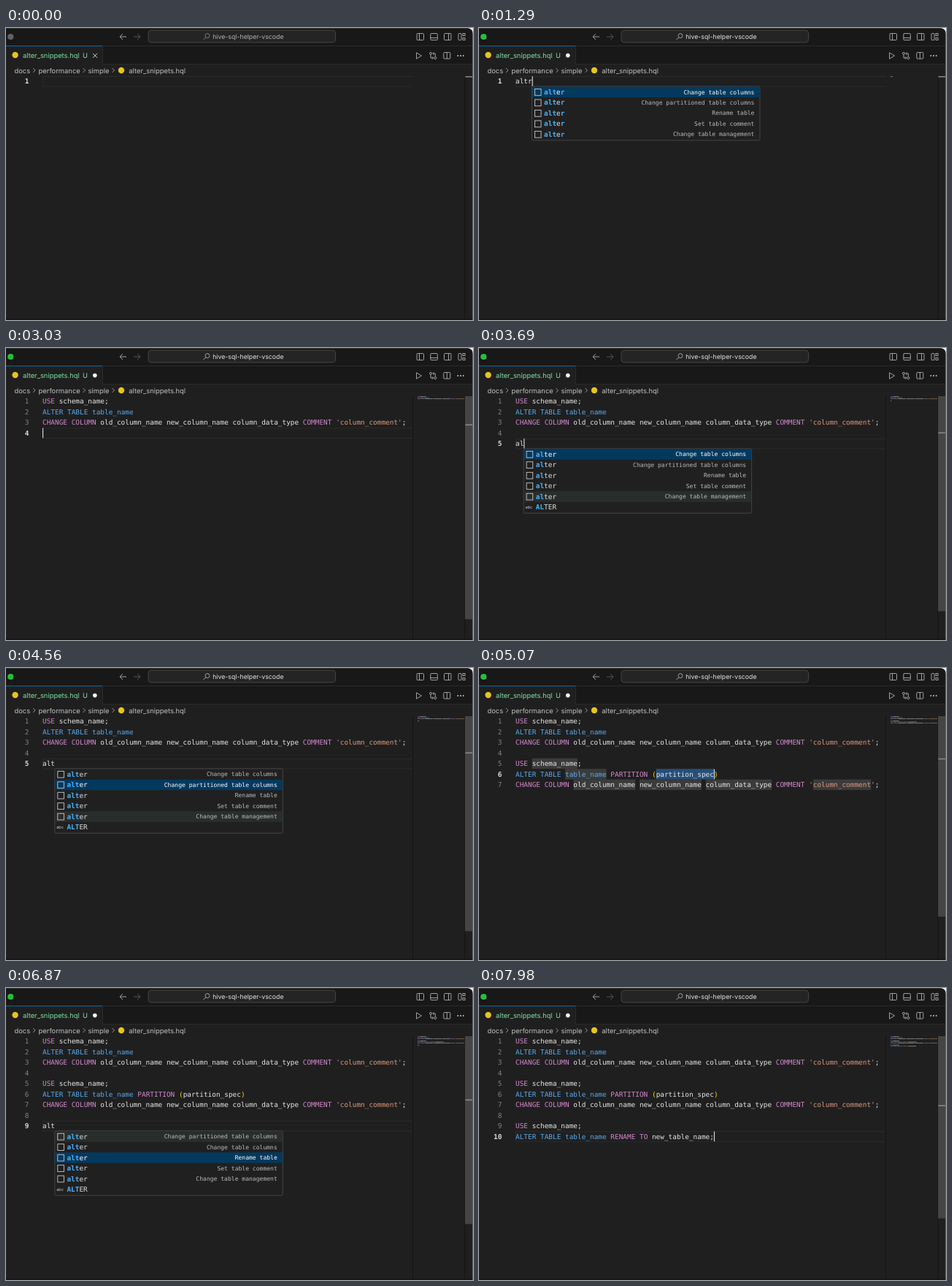
An HTML page for the animation above (8000 ms loop, 640 by 400 pixels).

```html
<!DOCTYPE html>
<html lang="en">
<head>
<meta charset="utf-8">
<title>Snippet completion</title>
<style>
html, body { margin: 0; width: 100%; height: 100%; overflow: hidden; background: #1f1f1f; }
svg { display: block; width: 640px; height: 400px; }
text { white-space: pre; text-rendering: geometricPrecision; }
.ui { font: 9.4px Inter, "Open Sans", sans-serif; }
.code { font: 9.41px "DejaVu Sans Mono", monospace; }
.current { font-weight: bold; }
.hint { font: 8.06px "DejaVu Sans Mono", monospace; text-anchor: end; }
.abc { font: 5.6px Inter, sans-serif; }
.icon { fill: none; stroke: #b0b0b0; stroke-width: .9; }
#title { font-size: 8.75px; }
</style>
</head>
<body>
<svg viewBox="0 0 640 400">
  <rect width="640" height="400" fill="#1f1f1f"/>
  <rect width="640" height="50" fill="#181818"/>
  <path d="M0 24.5H640M132 49.5H640M132.5 25V50" stroke="#2b2b2b"/>
  <rect y="25" width="132" height="25" fill="#1f1f1f"/>
  <rect y="24" width="132" height="1.2" fill="#0c609f"/>
  <path d="M0 .5H640" stroke="#333"/>

  <circle id="light" cx="6.3" cy="12" r="4.1"/>
  <path class="icon" d="M165 12H156M160 8L156 12L160 16"/>
  <path class="icon" d="M175 12H184M180 8L184 12L180 16" style="stroke:#5c5c5c"/>
  <rect x="195" y="3.2" width="256.5" height="16.6" rx="4" fill="#242424" stroke="#454545"/>
  <g id="search" class="icon"><circle cx="276" cy="10.6" r="3"/><path d="M273.8 12.8L270.5 16.2"/></g>
  <text id="title" class="ui" x="283.2" y="14.6">hive-sql-helper-vscode</text>

  <g class="icon">
    <rect x="563" y="7.5" width="9.5" height="9" rx="1"/><path d="M566.5 7.5V16.5"/>
    <rect x="581.8" y="7.5" width="9.5" height="9" rx="1"/><path d="M582 13.5H591"/>
    <rect x="600.5" y="7.5" width="9.5" height="9" rx="1"/><path d="M606.5 7.5V16.5"/>
    <rect x="620" y="7.5" width="4" height="9" rx="1"/>
    <rect x="626" y="7.5" width="3" height="3"/><rect x="626" y="13.5" width="3" height="3"/>
    <path d="M562.5 33.8L569.5 38L562.5 42.2Z"/>
    <circle cx="582" cy="34.8" r="1.5"/><circle cx="588.3" cy="41.2" r="1.5"/>
    <path d="M582 36.5V41H585.5M584 39.3L585.7 41L584 42.7M588.3 39.5V35H585M586.5 33.3L584.8 35L586.5 36.7"/>
    <rect x="599.8" y="33.5" width="9" height="8.5" rx="1"/><path d="M604.3 33.5V42"/>
  </g>
  <g fill="#c5c5c5"><circle cx="619.3" cy="38" r="1"/><circle cx="623" cy="38" r="1"/><circle cx="626.7" cy="38" r="1"/></g>

  <g fill="#e5c51f"><circle cx="12.6" cy="37" r="4.2"/><circle cx="158" cy="58" r="4.2"/></g>
  <g class="ui" fill="#7fe0a0"><text x="23" y="40.6">alter_snippets.hql</text><text x="105" y="40.6">U</text></g>
  <path id="close" class="icon" d="M119 34.8L125 40.8M125 34.8L119 40.8" style="stroke:#e4e4e4"/>
  <circle id="dirty" cx="121.8" cy="37.6" r="2.8" fill="#fff"/>

  <g class="ui" fill="#c0c0c0">
    <text x="11.5" y="61.5">docs</text><text x="44.5" y="61.5">performance</text>
    <text x="112.5" y="61.5">simple</text><text x="168.3" y="61.5">alter_snippets.hql</text>
  </g>
  <path class="icon" d="M37 55L40 58L37 61M105.5 55L108.5 58L105.5 61M145.5 55L148.5 58L145.5 61" style="stroke:#a0a0a0"/>

  <g id="editor"></g>
  <path d="M629 66V398" stroke="#141414"/>
  <g id="ruler"></g>
  <path d="M0 398.5H640" stroke="#161616"/>
  <rect y="399" width="640" height="1" fill="#181818"/>
  <path d="M639.5 0V400" stroke="#5c5c5c"/>
  <path d="M633 0H640V8Q639.5 1 633 0Z" fill="#f0f0f0"/>
</svg>
<script>
const LOOP = 8000, LEFT = 50, TOP = 65.8, ROW = 14.47, CH = 5.665, VIEW = 344;
const $ = id => document.getElementById(id);
const CHANGE = "CHANGE COLUMN {old_column_name} {new_column_name} {column_data_type} COMMENT '{column_comment}';";
const snippets = {
  "Change table columns": ["USE {schema_name};", "ALTER TABLE {table_name}", CHANGE],
  "Change partitioned table columns":
    ["USE {schema_name};", "ALTER TABLE {table_name} PARTITION ({partition_spec})", CHANGE],
  "Rename table": ["USE {schema_name};", "ALTER TABLE {table_name} RENAME TO {new_table_name};"],
  "Set table comment": [],
  "Change table management": []
};

const steps = [
  [180, "focus"],
  [510, "type", "a"], [720, "type", "l"], [930, "type", "t"], [1200, "type", "r"], [1500, "accept"],
  [1740, "tab"], [1920, "tab"], [2130, "tab"], [2340, "tab"], [2550, "tab"], [2760, "tab"],
  [3030, "enter"], [3240, "enter"],
  [3480, "type", "a"], [3660, "type", "l"], [3840, "type", "t"], [4140, "down"], [4620, "accept"],
  [4890, "tab"], [5040, "tab"], [5220, "tab"], [5340, "tab"], [5460, "tab"], [5580, "tab"], [5700, "tab"],
  [5820, "enter"], [5970, "enter"],
  [6090, "type", "a"], [6210, "type", "l"], [6330, "type", "t"], [6720, "down"], [6870, "down"],
  [7080, "accept"], [7320, "tab"], [7560, "tab"], [7800, "tab"]
];

const actions = {
  focus(s) { s.focus = true; },
  type(s, ch) {
    s.lines[s.row] += ch;
    s.col++;
    s.dirty = s.popup = true;
    s.pick = 0;
  },
  down(s) { s.pick++; },
  enter(s) { s.lines.push(""); s.row++; s.col = 0; },
  accept(s) {
    const name = s.names[s.pick], first = s.row;
    s.names = [name, ...s.names.filter(n => n !== name)];
    s.popup = false;
    s.lines.pop();
    snippets[name].forEach((line, i) => {
      let text = "";
      line.split(/[{}]/).forEach((part, k) => {
        if (k % 2) s.stops.push({ row: first + i, col: text.length, len: part.length });
        text += part;
      });
      s.lines.push(text);
    });
    s.stop = -1;
    actions.tab(s);
  },
  tab(s) {
    const p = s.stops[++s.stop];
    if (p) { s.row = p.row; s.col = p.col + p.len; return; }
    s.stops = [];
    s.row = s.lines.length - 1;
    s.col = s.lines[s.row].length;
  }
};

// Replay the key presses once and keep the state after each of them.
let state = { at: 0, moved: 0, lines: [""], row: 0, col: 0, stops: [], stop: 0, pick: 0, names: Object.keys(snippets) };
const states = [state];
for (const [at, act, arg] of steps) {
  state = structuredClone(state);
  state.at = at;
  if (act !== "down") state.moved = at;
  actions[act](state, arg);
  states.push(state);
}

const rect = (x, y, w, h, fill, more = "") =>
  `<rect x="${x}" y="${y}" width="${w}" height="${h}" fill="${fill}" ${more}/>`;
const text = (cls, x, y, fill, body, more = "") =>
  `<text class="${cls}" x="${x}" y="${y}" fill="${fill}" ${more}>${body}</text>`;
const lineY = row => TOP + row * ROW;

function tokens(line) {
  const re = /('[^']*'|\b(?:USE|CHANGE|COLUMN|COMMENT|PARTITION|RENAME|TO|ALTER|TABLE|table_name)\b|[()])/;
  return line.split(re).filter(Boolean).map(word => {
    let color = "#e6e6e6";
    if (/^'/.test(word)) color = "#de9a7c";
    else if (/^[()]$/.test(word)) color = "#ffd700";
    else if (/^(ALTER|TABLE|table_name)$/.test(word)) color = "#58a9ea";
    else if (re.test(word)) color = "#d088ca";
    return [color, word];
  });
}

function minimap(line, row) {
  let col = 0, out = "";
  for (const [color, chunk] of tokens(line)) {
    for (const word of chunk.split(/( )/)) {
      if (word.trim()) out += rect(564 + col * .73, 66.2 + row * 1.45, word.length * .73, .9, color, 'opacity=".5"');
      col += word.length;
    }
  }
  return out;
}

function label(word, typed) {
  let n = 0;
  return [...word].map(ch => ch.toLowerCase() === typed[n]
    ? (n++, `<tspan fill="#48b2fa" font-weight="bold">${ch}</tspan>`) : ch).join("");
}

function popup(s) {
  const x = LEFT + s.col * CH - .2, y = lineY(s.row + 1) - .3, typed = s.lines[s.row];
  const rows = s.names.map(n => ["alter", n]);
  if (s.row) rows.push(["ALTER", ""]);
  let out = rect(x, y, 312.5, rows.length * ROW + 1.6, "#202020", 'stroke="#454545" rx="1.5"');
  rows.forEach(([word, hint], i) => {
    const top = y + .5 + i * ROW, mid = top + ROW / 2, on = i === s.pick;
    const hover = Math.abs(mid - 203) < ROW / 2;
    if (on || hover) out += rect(x + .5, top, 311.5, ROW, on ? "#04395e" : "#2a2d2e");
    out += hint
      ? rect(x + 4, mid - 4.2, 8.6, 8.8, "none", 'stroke="#c8c8c8" stroke-width=".9"')
      : text("abc", x + 2.4, mid + 2, "#ccc", "abc");
    out += text("code", x + 16.6, mid + 3.3, on ? "#fff" : "#ddd", label(word, typed));
    out += text("hint", x + 305, mid + 2.8, on ? "#fff" : "#bcbcbc", hint);
  });
  return out;
}

function draw(s, caret) {
  const y = lineY(s.row), total = s.lines.length;
  const scale = VIEW / (VIEW + (total - 1) * ROW);
  let out = "";
  if (!s.stops.length) out += `<path d="M558 ${y + .7}H50.5v13.6H558" fill="none" stroke="#2b2b2b"/>`;
  s.stops.forEach((p, i) => {
    out += rect(LEFT + p.col * CH, lineY(p.row), p.len * CH, ROW, i === s.stop ? "#264f78" : "#3b3b3b");
  });
  s.lines.forEach((line, i) => {
    const base = lineY(i) + 10.6, here = i === s.row;
    out += text(here ? "code current" : "code", 31.3, base, here ? "#dcdcdc" : "#7a828c", i + 1, 'text-anchor="end"');
    out += text("code", LEFT, base, "#e6e6e6",
      tokens(line).map(([c, w]) => `<tspan fill="${c}">${w}</tspan>`).join(""));
    out += minimap(line, i);
  });
  if (total > 1) out += rect(557, 66, 1, 332, "#141414");
  if (caret) out += rect(LEFT + s.col * CH, y + .4, 1.1, 13.6, "#e0e0e0");
  if (s.popup) out += popup(s);
  $("editor").innerHTML = out;

  $("ruler").innerHTML =
    (total > 1 ? rect(629, 66, 10, VIEW * scale, "#797979", 'opacity=".42"') : "") +
    rect(629.5, 66 + s.row * ROW * scale, 9.5, 1.5, "#8c8c8c");

  $("light").setAttribute("fill", s.focus ? "#26bf3d" : "#626262");
  $("title").setAttribute("fill", s.focus ? "#e2e2e2" : "#b2b2b2");
  $("search").style.stroke = s.focus ? "#aaa" : "#858585";
  $("close").style.display = s.dirty ? "none" : "";
  $("dirty").style.display = s.dirty ? "" : "none";
}

let shown;
function tick() {
  const t = performance.now() % LOOP;
  const i = states.findLastIndex(s => s.at <= t), s = states[i];
  const caret = !!s.focus && (t - s.moved) % 1000 < 500;
  const key = i + ":" + caret;
  if (key !== shown) draw(s, caret);
  shown = key;
  requestAnimationFrame(tick);
}
tick();
</script>
</body>
</html>
```
